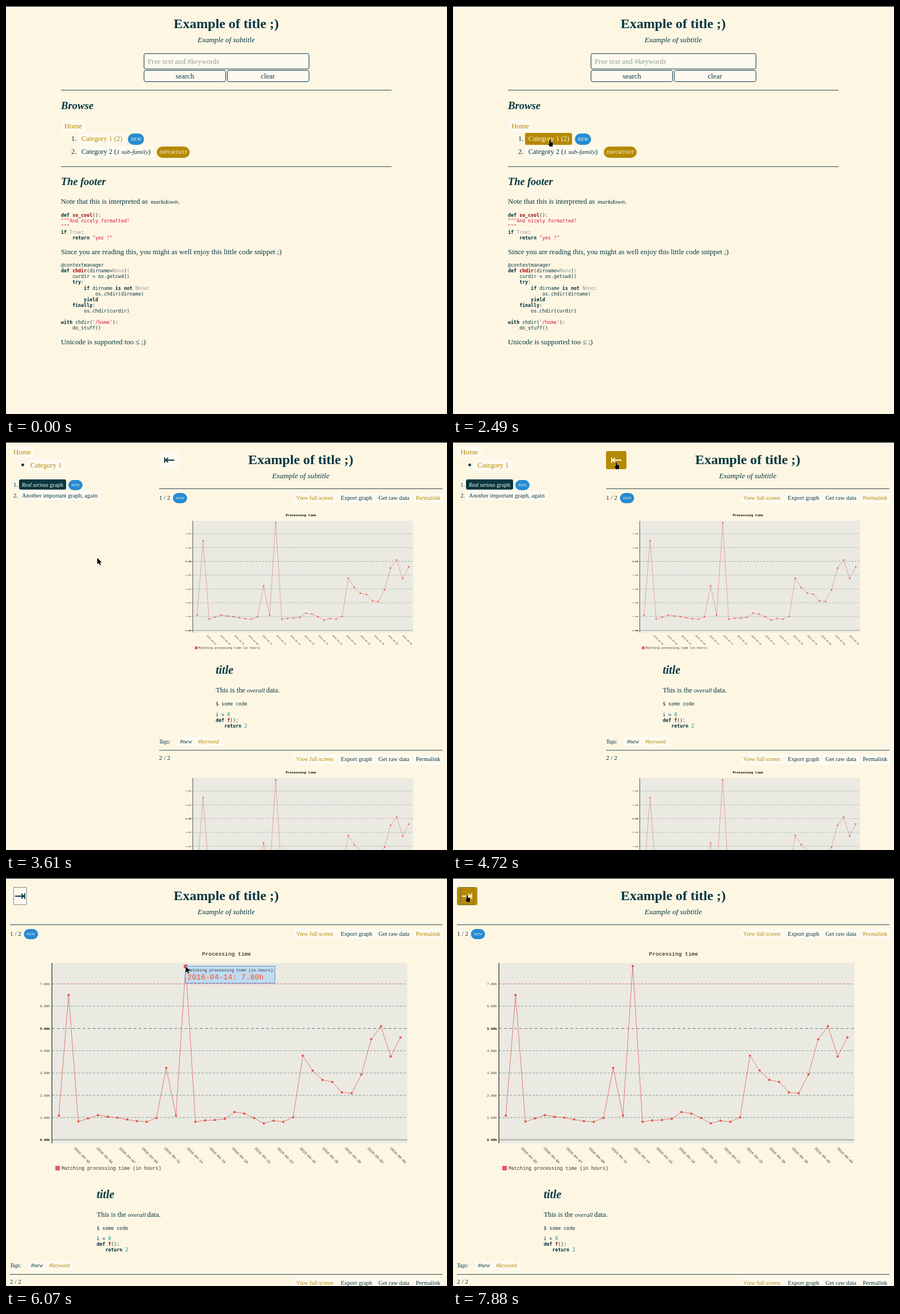
Write an HTML page that moves like this. It is 778 px wide and 720 px high and loops after 7.99 s.

```html
<!DOCTYPE html>
<html lang="en">
<head>
<meta charset="utf-8">
<title>Graph browser</title>
<style>
  html, body { margin: 0; width: 100%; height: 100%; overflow: hidden; background: #fdf6e3; }
  svg { display: block; }
  text { font-family: 'Liberation Serif', serif; fill: #073642; white-space: pre; }
  .i { font-style: italic; }
  .b { font-weight: bold; }
  .gold { fill: #b58900; }
  .pale { fill: #fdf6e3; }
  .hint { fill: #8d9c98; }
  .mid { text-anchor: middle; }
  .end { text-anchor: end; }
  .mono { font-family: 'Liberation Mono', monospace; fill: #333; }
  .black { fill: #000; }
  .code { font-family: 'DejaVu Sans Mono', monospace; font-size: 8.38px; }
  .kw { font-weight: bold; fill: #002b36; }
  .fn { font-weight: bold; fill: #900; }
  .str { fill: #d14; }
  .const { fill: #999; }
  .num { fill: #099; }
  .link rect { fill: #fefaf0; }
  .hot rect { fill: #b58900; }
  .hot text { fill: #fdf6e3; }
  .rule { stroke: #2f4a4f; }
  .field { fill: #fefaf0; stroke: #073642; }
  .arrow { fill: none; stroke: #073642; stroke-width: 1.8; }
  .hot .arrow { stroke: #fdf6e3; }
  .cursor { fill: #000; stroke: #fff; stroke-width: .7; paint-order: stroke; }
</style>
</head>
<body>
<svg id="stage" width="778" height="720" viewBox="0 0 778 720"></svg>
<script>
const LOOP = 7990;

// ---- drawing helpers ----
const text = (s, x, y, size = 12.8, cls = '') =>
  `<text x="${x}" y="${y}" font-size="${size}" class="${cls}">${s}</text>`;
const rect = (x, y, w, h, attrs = '') =>
  `<rect x="${x}" y="${y}" width="${w}" height="${h}" ${attrs}/>`;
const line = (x1, y1, x2, y2, attrs) =>
  `<path d="M${x1} ${y1}L${x2} ${y2}" ${attrs}/>`;
const rule = (x1, x2, y) => line(x1, y, x2, y, 'class="rule"');
const link = (x, y, w, h, inner) =>
  `<g class="link">${rect(x, y, w, h, 'rx="3"')}${inner}</g>`;

const badge = (s, x, y, w, h, fill, size) =>
  rect(x, y, w, h, `rx="${h / 2}" fill="${fill}"`) +
  text(s, x + w / 2, y + h / 2 + size * .34, size, 'i pale mid');
const smallNew = (x, y) => badge('NEW', x, y, 25, 18, '#268bd2', 7);

const TOKEN = /(def )(\w+)|("""[^]*|"[^"]*"|'[^']*')|\b(if|return|try|is|not|yield|finally|with)\b|\b(None|True)\b|\b(\d)\b/g;
const span = (cls, s) => `<tspan class="${cls}">${s}</tspan>`;
const paint = s => s.replace(TOKEN, (all, def, name, str, kw, constant) =>
  def ? span('kw', def) + span('fn', name) :
  span(str ? 'str' : kw ? 'kw' : constant ? 'const' : 'num', all));
const code = (x, y, source) => source.split('\n').map((s, i) =>
  `<text class="code" x="${x}" y="${y + i * 10.06}">${paint(s)}</text>`).join('');

const heading = cx =>
  text('Example of title ;)', cx, 39, 24.1, 'b mid') +
  text('Example of subtitle', cx, 64, 13.1, 'i mid');

// ---- chart, laid out at full size and scaled when the sidebar is open ----
const VALUES = [1.09, 6.5, .82, .96, 1.11, 1.04, .99, .91, .84, .81, .98, 3.23,
  1.09, 7.8, .81, .87, .89, .94, 1.25, 1.18, .98, .74, .86, .81, 1.01, 3.78,
  3.11, 2.69, 2.6, 2.13, 2.09, 2.93, 4.51, 5.1, 3.74, 4.6];
const LEGEND = 'Matching processing time (in hours)';
const valueY = v => 462 - v * 39.3;
const pad = n => String(n).padStart(2, '0');

function chart(transform, accents = {}, titleCls = '') {
  let out = rect(81, 150, 627, 318, 'fill="#eaeae2"') +
    text('Processing time', 389, 137, 9.65, 'mono black mid ' + titleCls);
  for (let v = 0; v < 8; v++) {
    const major = v % 5 == 0, y = valueY(v);
    const color = accents[v] || (major ? '#6b7478' : '#8b979b');
    const dash = v ? `stroke-dasharray="${major ? '5 4' : '4 2.6'}"` : '';
    out += line(81, y, 708, y, `stroke="${color}" ${dash}`) +
      text(v + '.00h', 77.5, y + 2.2, 5.85, 'mono end' + (major ? ' b black' : ''));
  }
  out += line(81, 150, 81, 468, 'stroke="#222" stroke-width="1.2"');
  for (let i = 0; i < 15; i++) {
    const day = 2 + Math.round(i * 7 / 3);
    const date = `2016-${day > 30 ? '05' : '04'}-${pad(day > 30 ? day - 30 : day)}`;
    out += `<g transform="translate(${119.5 + i * 39.82} 477.5) rotate(45)">${text(date, 0, 0, 6.3, 'mono')}</g>`;
  }
  const points = VALUES.map((v, i) => [93.2 + i * 17.22, valueY(v)]);
  out += `<polyline points="${points.join(' ')}" fill="none" stroke="#e06a70" stroke-width=".9"/>` +
    points.map(([x, y]) => `<circle cx="${x}" cy="${y}" r="2" fill="#ee5138"/>`).join('') +
    rect(87, 508, 8, 8, 'fill="#e3566c"') + text(LEGEND, 98, 515, 8.4, 'mono');
  return `<g class="chart" transform="${transform}">${out}</g>`;
}

// ---- pages ----
const toolbar = (y, permaCls) => [
  ['View full screen', 512, 66, 10, 'gold'],
  ['Export graph', 590.5, 56, 10.6, ''],
  ['Get raw data', 657, 55, 10.7, ''],
  ['Permalink', 723, 43, 10.5, permaCls]
].map(([s, x, w, size, cls]) =>
  link(x - 5, y - 12, w + 10, 18, text(s, x, y, size, cls))).join('');

const notes = (x, y) =>
  text('title', x, y, 20, 'b i') +
  text('This is the', x, y + 33, 12.5) +
  text('overall', x + 55, y + 33, 11.2, 'i') +
  text('data.', x + 89, y + 33, 12.5) +
  code(x, y + 56, '$ some code') +
  code(x, y + 74.5, 'i = 0\ndef f():\n   return 2');

const panel = (left, notesX, noteY) =>
  heading((left + 770) / 2) + rule(left, 770, 82.5) +
  text('1 / 2', left, 102, 11.2) + smallNew(left + 24.5, 90) + toolbar(101.5, 'gold') +
  notes(notesX, noteY) +
  text('Tags:', left, noteY + 122.5, 9.4, 'i') +
  link(left + 32, noteY + 111, 31, 17, text('#new', left + 37, noteY + 122.5, 10, 'i')) +
  link(left + 63, noteY + 111, 49, 17, text('#keyword', left + 69, noteY + 122.5, 9.5, 'i gold')) +
  rule(left, 770, noteY + 135) +
  text('2 / 2', left, noteY + 151.5, 11.2) + toolbar(noteY + 153.8, '');

const browse =
  heading(388.5) +
  rect(243.5, 84, 291, 27, 'rx="2.5" class="field"') +
  text('Free text and #keywords', 250, 102, 12.8, 'hint') +
  rect(243.5, 113.5, 144, 20, 'rx="3" class="field"') + text('search', 315.5, 128, 12.8, 'mid') +
  rect(390.5, 113.5, 144, 20, 'rx="3" class="field"') + text('clear', 462, 128, 12.8, 'mid') +
  rule(97, 680, 148.5) + text('Browse', 97, 182, 18.8, 'b i') +
  link(97, 201, 43, 21, text('Home', 103, 216, 12.8, 'gold')) +
  text('1.', 115, 238) +
  link(127, 224, 83, 21, text('Category 1 (2)', 133, 238, 12.4, 'gold')) +
  badge('NEW', 215, 225, 28.5, 20, '#268bd2', 9) +
  text('2.', 115, 261) +
  link(127, 247, 134, 21, text('Category 2 (', 133, 261, 12.4) +
    text('1 sub-family', 195, 261, 11.3, 'i') + text(')', 251, 261, 12.4)) +
  badge('IMPORTANT', 266, 248, 58, 20, '#b58900', 9) +
  rule(97, 680, 283.5) + text('The footer', 97, 316, 18.4, 'b i') +
  text('Note that this is interpreted as', 97, 349) +
  text('markdown', 255, 349, 11.4, 'i') + text('.', 303.5, 349) +
  code(97, 371.7, 'def so_cool():\n"""And nicely formatted!\n"""\nif True:\n    return "yes !"') +
  text('Since you are reading this, you might as well enjoy this little code snippet ;)', 97, 437.5) +
  code(97, 460.3, `@contextmanager
def chdir(dirname=None):
    curdir = os.getcwd()
    try:
        if dirname is not None:
            os.chdir(dirname)
        yield
    finally:
        os.chdir(curdir)

with chdir('/home'):
    do_stuff()`) +
  text('Unicode is supported too ≤ ;)', 97, 596.5);

const split =
  link(7, 8, 43, 20, text('Home', 13, 22, 12.8, 'gold')) +
  '<circle cx="29.5" cy="40.5" r="2.4" fill="#073642"/>' +
  link(37, 30, 67, 20, text('Category 1', 43, 44.5, 12.5, 'gold')) +
  text('1.', 13, 79, 10.7) + rect(23, 66, 83, 18, 'rx="3" fill="#073642"') +
  text('Real serious', 28, 79, 9.4, 'i pale') + text('graph', 77, 79, 10.6, 'pale') +
  smallNew(110, 67) +
  text('2.', 13, 97.5, 10.7) +
  link(23, 86, 144, 17, text('Another important graph, again', 28, 97.5, 10.6)) +
  link(270, 16, 36, 32, '<path class="arrow" d="M280 27V37M281 32H297M286 28L281.5 32L286 36"/>') +
  panel(270, 370, 409) +
  chart('translate(279.3 46.1) scale(.6196)', {}, 'b') +
  chart('translate(279.3 500) scale(.6196)', { 5: '#b47fc0' }, 'b');

const wide =
  link(7, 16, 36, 32, '<path class="arrow" d="M33 27V37M16 32H32M27 28L31.5 32L27 36"/>') +
  rect(13.5, 16.5, 23, 30.5, 'fill="none" stroke="#586e5f" stroke-width=".8"') +
  panel(7, 160, 564.5) + chart('', { 7: '#d2647a' }) +
  `<g id="tip"><circle cx="317" cy="156" r="3.6" fill="#e5484a"/>` +
  rect(316.5, 155.5, 158, 30, 'fill="#bfdcf0" stroke="#6b8fc0"') +
  text(LEGEND, 320, 164.5, 7.2, 'mono') +
  `<text class="mono" x="320" y="179" font-size="13.2" style="fill:#ff4a1c">2016-04-14: 7.80h</text></g>`;

const stage = document.getElementById('stage');
stage.innerHTML = rect(0, 0, 778, 720, 'fill="#fdf6e3"') +
  [browse, split, wide].map(p => `<g class="page">${p}</g>`).join('') +
  rect(0, 0, 778, 1) +
  '<path id="cursor" class="cursor"/>';

const pages = [...stage.querySelectorAll('.page')];
const links = pages.map(p => [...p.querySelectorAll('.link')].map(el => {
  const r = el.querySelector('rect');
  return { el, box: ['x', 'y', 'width', 'height'].map(a => +r.getAttribute(a)) };
}));
const splitCharts = pages[1].querySelectorAll('.chart');
const tip = document.getElementById('tip');
const cursor = document.getElementById('cursor');
const POINTER = 'M0 0V11L2.6 8.7L4.3 12.8L6.2 12L4.5 8H8Z';
const HAND = 'M-1 .6Q0-.6 1 .6V4L5 5V9.5L4.4 12H-.4L-2.8 8Q-3 6.4-1 7Z';

// ---- timeline: time, x, y of the pointer ----
const MOVES = [
  [550, 769, 238], [1070, 149, 100], [1390, 149, 100], [1750, 175, 255],
  [1850, 175, 255], [2070, 168, 234], [2190, 168, 234], [2490, 171, 236],
  [2680, 171, 236], [2810, 161, 204.5], [4200, 161, 204.5], [4650, 288, 36],
  [4750, 288, 36], [4950, 288, 38.5], [5000, 288, 38.5], [5300, 229, 75],
  [5790, 313, 157], [5830, 313, 157], [5950, 317, 156], [6630, 317, 156],
  [6980, 26, 34], [7070, 24, 48], [7530, 24, 48], [7610, 146, 49],
  [7880, 146, 49], [7880, 25, 30.5], [LOOP, 25, 30.5]
];
const clamp = v => Math.min(1, Math.max(0, v));

function pointer(t) {
  const next = MOVES.findIndex(m => m[0] > t);
  if (next < 1) return MOVES[0].slice(1);
  const [t0, x0, y0] = MOVES[next - 1], [t1, x1, y1] = MOVES[next];
  const p = (t - t0) / (t1 - t0), e = p * p * (3 - 2 * p);
  return [x0 + (x1 - x0) * e, y0 + (y1 - y0) * e];
}

function draw(t) {
  const shown = t < 3200 ? 0 : t < 4800 ? 1 : 2;
  pages.forEach((p, i) => p.style.display = i == shown ? '' : 'none');
  splitCharts.forEach(c => c.style.display = t < 3610 ? 'none' : '');
  tip.style.opacity = Math.min(clamp((t - 5800) / 260), clamp((6830 - t) / 200));

  const [x, y] = pointer(t);
  const visible = t >= 550 && !(t >= 3910 && t < 4200);
  let over = false;
  for (const { el, box: [bx, by, w, h] } of links[shown]) {
    const hot = visible && x >= bx && x < bx + w && y >= by && y < by + h;
    el.classList.toggle('hot', hot);
    over ||= hot;
  }
  cursor.style.display = visible ? '' : 'none';
  cursor.setAttribute('d', over ? HAND : POINTER);
  cursor.setAttribute('transform', `translate(${x} ${y})`);
}

function tick() {
  draw(performance.now() % LOOP);
  requestAnimationFrame(tick);
}
tick();
</script>
</body>
</html>
```
